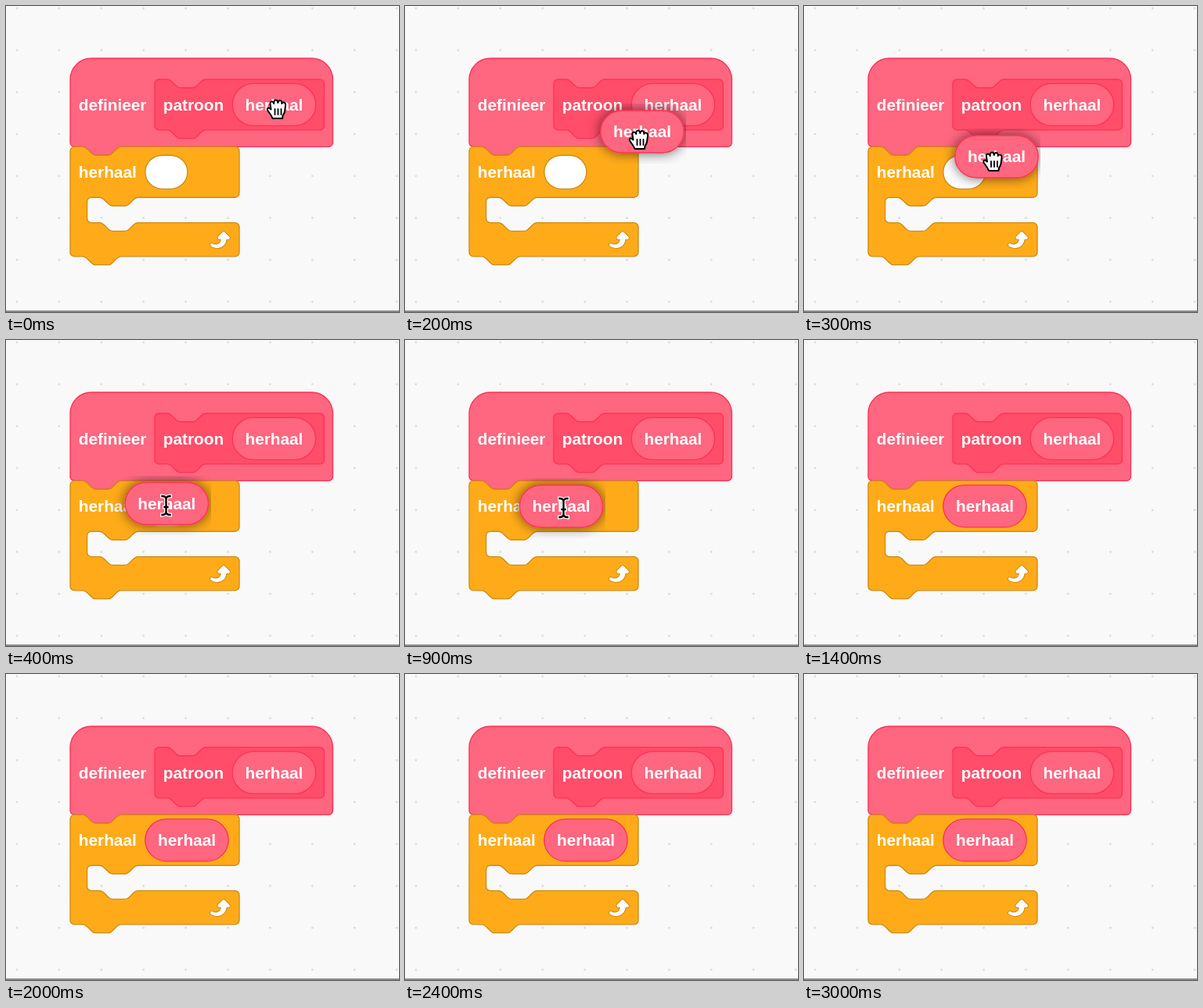
Animation of 502x392 px, one loop 3300 ms. Source, as an HTML page:

```html
<!DOCTYPE html>
<html lang="nl">
<head>
<meta charset="utf-8">
<title>Blokken</title>
<style>
  html, body { margin: 0; width: 100%; height: 100%; overflow: hidden; background: #f9f9f9; }
  svg { display: block; width: 502px; height: 392px; }
  text { font: bold 15.4px "Liberation Sans", Arial, sans-serif; fill: #fff; }
  .pink { fill: #ff6680; stroke: #ff3355; }
  .proto { fill: #ff4d6a; stroke: #ff3355; }
  .orange { fill: #ffab19; stroke: #cf8b17; }
  .mid { text-anchor: middle; }
</style>
</head>
<body>
<svg viewBox="0 0 502 392">
  <defs>
    <filter id="lift" x="-15%" y="-15%" width="117.5%" height="140%">
      <feDropShadow dx="0" dy="0" stdDeviation="6" flood-color="#000" flood-opacity=".6"/>
    </filter>
    <filter id="soft" x="-40%" y="-40%" width="180%" height="180%">
      <feGaussianBlur stdDeviation="1.5"/>
    </filter>
    <g id="pill">
      <rect class="pink" x="-39.4" y="-20" width="78.8" height="40" rx="20"/>
      <text class="mid" y="5.4">herhaal</text>
    </g>
  </defs>
  <g id="dots" fill="#ddd"></g>
  <rect y="390" width="502" height="2" fill="#8c8c8c"/>

  <g transform="translate(82 180.4) scale(1.35)">
    <path id="hat" class="pink"/>
    <path id="proto" class="proto"/>
    <use href="#pill" x="192.9" y="-40"/>
    <text x="8" y="-34.6">definieer</text>
    <text x="88" y="-34.6">patroon</text>
    <path id="loop" class="orange"/>
    <text x="8" y="29.4">herhaal</text>
    <rect id="glow" x="69" y="6" width="44" height="36" rx="18" fill="#fff" filter="url(#soft)"/>
    <rect class="orange" x="71" y="8" width="40" height="32" rx="16" style="fill:#fff"/>
    <path transform="translate(128 76)" fill="#fff" stroke="#cf8b17" stroke-width=".8"
      d="M23 9.2L18.4 4.6Q17.2 3.6 16 4.6L11.6 9Q10.7 10.3 11.4 11.2Q12 12 13 12H14.4Q14.3 14.2 12.6 15.4Q10 17.2 7 15.5Q5.6 14.8 4.7 15.7Q3.7 17 4.6 18.3Q9 22 15 19.7Q19.8 17 20.2 12H21.8Q23 12 23.4 10.8Q23.6 9.8 23 9.2Z"/>
  </g>

  <g id="drag"><use href="#pill"/></g>

  <g id="hand" stroke="#000" stroke-width="2" stroke-linejoin="round" stroke-linecap="round">
    <path fill="#fff" d="M-5 12Q-6 9-9 5L-11.5 1.5Q-12.5-1.5-9.5-1.5L-7 .5L-8-6Q-8.5-9.5-6-9.5Q-4-9.5-3.3-7Q-3.5-11.5-.8-11.5Q1.5-11.5 1.8-8Q2.2-11 4.5-11Q7-11 6.8-7Q7.5-9 9.5-8.5Q12-8 11.5-4L10.5 3Q10 6 8 8.5L7.5 12Z"/>
    <path fill="none" stroke-width="1.8" d="M-2 0V7M2 0V7M6 0V7"/>
  </g>
  <g id="beam" fill="none" stroke-linecap="square">
    <path class="bar" stroke="#fff" stroke-width="5"/>
    <path class="bar" stroke="#000" stroke-width="2.4"/>
  </g>
</svg>
<script>
  const $ = id => document.getElementById(id);
  const SCALE = 1.35, LOOP = 3300;

  // Connector outline, drawn rightwards and leftwards.
  const right = 'c2 0 3 1 4 2l4 4c1 1 2 2 4 2h12c2 0 3-1 4-2l4-4c1-1 2-2 4-2';
  const left = 'c-2 0-3 1-4 2l-4 4c-1 1-2 2-4 2h-12c-2 0-3-1-4-2l-4-4c-1-1-2-2-4-2';
  const arc = (dx, dy, r = 4, sweep = 1) => `a${r} ${r} 0 0 ${sweep} ${dx * r} ${dy * r}`;
  const TL = arc(1, -1), TR = arc(1, 1), BR = arc(-1, 1), BL = arc(-1, -1);

  $('hat').setAttribute('d',
    `M0-64${arc(1, -1, 20)}H228.5${arc(1, 1, 20)}V-4${BR}H48${left}H4${BL}z`);
  $('proto').setAttribute('d',
    `M80-60${TL}H92${right}H236.3${TR}V-20${BR}H128${left}H84${BL}z`);
  $('loop').setAttribute('d',
    `M0 4${TL}H12${right}H156${TR}V44${BR}H64${left}H20${arc(-1, 1, 4, 0)}V68` +
    `${arc(1, 1, 4, 0)}H28${right}H156${TR}V100${BR}H48${left}H4${BL}z`);
  document.querySelectorAll('.bar').forEach(bar => bar.setAttribute('d',
    'M-5-12Q0-12 0-8V8Q0 12-5 12M5-12Q0-12 0-8M0 8Q0 12 5 12M-2 2H2'));

  let dots = '';
  for (let x = 14; x < 502; x += 53.9)
    for (let y = 3; y < 388; y += 53.7)
      dots += `<circle cx="${x}" cy="${y}" r="1.4"/>`;
  $('dots').innerHTML = dots;

  const HOME = [231, 212.8];
  // time, pill centre, cursor, cursor centre
  const steps = [
    [0, null, 'hand', [345.5, 132]],
    [100, [338, 132], 'hand', [336, 141]],
    [200, [303, 161], 'hand', [298.5, 171]],
    [300, [246, 193], 'hand', [241, 199]],
    [400, [205.3, 209.5], 'beam', [204.5, 212]],
    [500, [201, 212.5], 'beam', [203, 214.5]],
    [600, [199.5, 213], 'beam', [202.5, 215]],
    [1000, HOME, 'hand', [203, 216]],
    [1100, HOME, 'hand', [228, 248]],
    [1200, HOME, 'hand', [280, 311]],
    [1300, HOME, 'hand', [335, 376]],
    [1400, HOME, '', [0, 0]]
  ];

  const show = (id, on) => $(id).style.display = on ? '' : 'none';
  const move = (id, [x, y], tail = '') =>
    $(id).setAttribute('transform', `translate(${x} ${y})${tail}`);

  function draw(time) {
    const [start, pill, cursor, point] = steps.findLast(step => step[0] <= time);
    show('drag', pill);
    if (pill) move('drag', pill, ` scale(${SCALE})`);
    $('drag').setAttribute('filter', pill === HOME ? 'none' : 'url(#lift)');
    show('glow', start >= 400 && start < 1000);
    for (const id of ['hand', 'beam']) {
      show(id, id === cursor);
      move(id, point);
    }
  }

  const begin = performance.now();
  function tick() {
    draw((performance.now() - begin) % LOOP);
    requestAnimationFrame(tick);
  }
  tick();
</script>
</body>
</html>
```
